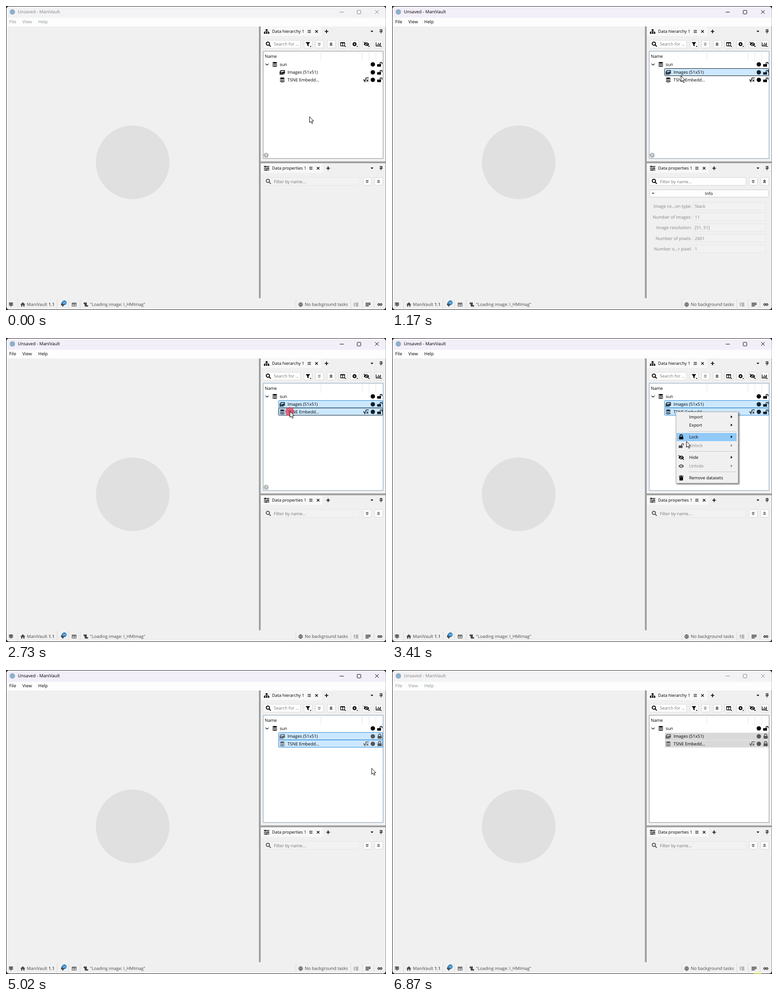
Recreate the animation shown at these times as an HTML page with a canvas. Size 837 by 669 pixels, loop 6930 ms.

```html
<!DOCTYPE html>
<html lang="en">
<head>
<meta charset="utf-8">
<title>Locking datasets</title>
<style>
html, body { margin: 0; width: 100%; height: 100%; overflow: hidden; background: #f0f0f0; }
canvas { display: block; }
</style>
</head>
<body>
<canvas id="stage" width="837" height="669"></canvas>
<script>
const ctx = document.getElementById('stage').getContext('2d');
const LOOP = 6930;
const FONT = '"Open Sans", "Noto Sans", sans-serif';

// Moments at which the interface switches state
const AT = { focus: 830, both: 1930, menu: 2860, sub: 4000, lock: 4890, blur: 6790 };
const CLICKS = [[830, 1030], [1930, 2130], [2730, 2860], [4890, 4960]];
const PATH = [
  [70, 668, 243], [760, 638, 146], [1030, 638, 146], [1170, 636, 153],
  [1520, 629, 160], [1660, 625, 161], [2860, 625, 161], [3410, 648, 227],
  [3480, 648, 228], [3740, 648, 228], [4200, 757, 217], [4420, 803, 217],
  [4490, 805, 216], [5770, 805, 216], [6000, 816, 330], [6320, 805, 672]
];

const band = y => `M-5 ${y}q5 2.6 10 0v1.7q-5 2.6-10 0z`;
const EYE = 'M-6 0Q0-8 6 0Q0 8-6 0ZM2.6 0a2.6 2.6 0 1 0-5.2 0a2.6 2.6 0 1 0 5.2 0ZM1.2 0a1.2 1.2 0 1 0-2.4 0a1.2 1.2 0 1 0 2.4 0Z';
const cog = r => Array.from({ length: 8 }, (_, i) => {
  const a = i * Math.PI / 4, c = Math.cos(a), s = Math.sin(a);
  return `M${c * r * .6} ${s * r * .6}L${c * r} ${s * r}`;
}).join('') + `M${r * .58} 0a${r * .58} ${r * .58} 0 1 0 ${-r * 1.16} 0a${r * .58} ${r * .58} 0 1 0 ${r * 1.16} 0`;

// f: filled path, s: stroked path, w: stroke width
const GLYPHS = {
  home: { f: 'M-5.5 0L0-5L5.5 0H3.8V4.5H1.2V1.5H-1.2V4.5H-3.8V0Z' },
  db: { f: 'M-5-3.3a5 1.9 0 0 1 10 0v.6q-5 2.6-10 0z' + band(-1.1) + band(2.2) },
  image: { f: 'M-2 1L0-1.5L1 0L3-2.5L5 1.5H-2Z', s: 'M-3.2-4H5V2.2H-3.2ZM-5-2V4.3H3', w: 1.5 },
  lock: { f: 'M-4.5-1H4.5V5H-4.5Z', s: 'M-2.6-1V-2.7a2.6 2.6 0 0 1 5.2 0V-1', w: 1.6 },
  unlock: { f: 'M-5.5-.5H3V5H-5.5Z', s: 'M1 0V-2.5a2.1 2.1 0 0 1 4.2 0V-.5', w: 1.5 },
  dot: { f: 'M4.8 0a4.8 4.8 0 1 0-9.6 0a4.8 4.8 0 1 0 9.6 0Z' },
  eye: { f: EYE },
  hidden: { f: EYE, s: 'M-6-5L6 5', w: 1.5 },
  trash: { f: 'M-5-4.5H-2L-1.3-5.5H1.3L2-4.5H5V-3H-5ZM-4.2-2.2H4.2L3.7 5.5H-3.7Z' },
  search: { s: 'M2.4-1.2a3.6 3.6 0 1 0-7.2 0a3.6 3.6 0 1 0 7.2 0M1.6 1.6L5.2 5.2', w: 2 },
  funnel: { f: 'M-5-4.5H5L1.4 0V5L-1.4 3V0Z' },
  down: { s: 'M-2.6-3L0-.7L2.6-3M-2.6 .6L0 2.9L2.6 .6', w: 1.4 },
  up: { s: 'M-2.6 3L0 .7L2.6 3M-2.6-.6L0-2.9L2.6-.6', w: 1.4 },
  fold: { s: 'M-3.4-1.7L0 1.7L3.4-1.7', w: 1.2 },
  foldSmall: { s: 'M-2-1L0 1L2-1', w: 1.1 },
  columns: { f: 'M-5-4H5V-2H-5Z', s: 'M-4.4-3.5H4.4V3.7H-4.4ZM0-3V3.7', w: 1.4 },
  gear: { s: cog(4.6), w: 2.1 },
  gears: { s: cog(3), w: 1.5 },
  chart: { s: 'M-5-4V4H5M-2.2 2.5V0M.4 2.5V-3M2.8 2.5V-1M4.8 2.5V-3.5', w: 1.3 },
  tree: { f: 'M-2-5H2V-1.5H-2ZM-6 1.8H-2.8V5H-6ZM-1.6 1.8H1.6V5H-1.6ZM2.8 1.8H6V5H2.8Z', s: 'M0-2V2M-4.4 2V.2H4.4V2', w: 1 },
  sliders: { s: 'M-6-3.8H6M-6 0H6M-6 3.8H6M-3-5.5V-2.1M3-1.7V1.7M-1 2.1V5.5', w: 1.5 },
  burger: { s: 'M-3.5-2.5H3.5M-3.5 0H3.5M-3.5 2.5H3.5', w: 1 },
  close: { s: 'M-2.8-2.8L2.8 2.8M2.8-2.8L-2.8 2.8', w: 1.3 },
  plus: { s: 'M-4 0H4M0-4V4', w: 1.7 },
  caret: { f: 'M-3.2-1.6H3.2L0 1.8Z' },
  arrow: { f: 'M-1.8-3L1.8 0L-1.8 3Z' },
  pin: { s: 'M-2.7-4H2.7M-1.7-4V.7M1.3-4V.7M2-4V.7M-3.3 .7H3.3M0 .7V4.6', w: 1.1 },
  root: { s: 'M-6 .5L-4.4 0L-2.5 4L0-4.2H6M1-.5L5 3.8M5-.5L1 3.8', w: 1.5 },
  pointer: { f: 'M-3.5-7V5L-.8 2.5L1.2 6.6L3 5.7L1 2H4.8Z' },
  globe: { s: 'M4.4 0a4.4 4.4 0 1 0-8.8 0a4.4 4.4 0 1 0 8.8 0M-4.4-1.2H4.4M-4.4 1.5H4.4M0-4.4V4.4M2 0a2 4.4 0 1 0-4 0a2 4.4 0 1 0 4 0', w: .9 },
  list: { s: 'M-1-3H5M-1 0H5M-1 3H5M-5-3L-4-2L-2.5-4M-5 0L-4 1L-2.5-1M-4.7 3H-3', w: 1 },
  grid: { s: 'M-5-3H6M-5 0H6M-5 3H2', w: 1.8 },
  sign: { f: 'M-4.5-4.3H3.5L5-2.9L3.5-1.5H-4.5ZM-3.5-.4H4.5V2.3H-3.5L-5 1Z', s: 'M0-5V5', w: 1.3 },
  plug: { f: 'M-4-1H4V1Q3 4 0 4Q-3 4-4 1Z', s: 'M-2-4V-1M2-4V-1M0 3V6', w: 1.4 },
  table: { s: 'M-4.4-3.5H4.4V3.5H-4.4ZM-4.4-.5H4.4M0-3.5V3.5M-4.4-2.8H4.4', w: 1.1 },
  scroll: { f: 'M-5-4.5H2V1.5H5V3Q5 4.5 3.5 4.5H-1.5Q-3 4.5-3-1H-5Z' }
};
for (const g of Object.values(GLYPHS)) {
  if (g.f) g.f = new Path2D(g.f);
  if (g.s) g.s = new Path2D(g.s);
}

function icon(name, x, y, color = '#000') {
  const g = GLYPHS[name];
  ctx.save();
  ctx.translate(x, y);
  ctx.fillStyle = ctx.strokeStyle = color;
  if (g.f) ctx.fill(g.f, 'evenodd');
  if (g.s) { ctx.lineWidth = g.w; ctx.stroke(g.s); }
  ctx.restore();
}
function rect(x, y, w, h, color) {
  ctx.fillStyle = color;
  ctx.fillRect(x, y, w, h);
}
function box(x, y, w, h, fill, border, r = 0) {
  ctx.beginPath();
  ctx.roundRect(x + .5, y + .5, w - 1, h - 1, r);
  if (fill) { ctx.fillStyle = fill; ctx.fill(); }
  ctx.strokeStyle = border;
  ctx.lineWidth = 1;
  ctx.stroke();
}
function disc(x, y, r, color) {
  ctx.beginPath();
  ctx.arc(x, y, r, 0, 7);
  ctx.fillStyle = color;
  ctx.fill();
}
// y is the middle of the line
function text(s, x, y, color = '#000', align = 'left', size = 9.5, weight = 400) {
  ctx.font = `${weight} ${size}px ${FONT}`;
  ctx.textAlign = align;
  ctx.fillStyle = color;
  ctx.fillText(s, x, y + 3.4);
}

function cursorAt(t) {
  const i = PATH.findIndex(k => k[0] > t);
  if (i === 0) return PATH[0].slice(1);
  if (i < 0) return PATH[PATH.length - 1].slice(1);
  const [t0, x0, y0] = PATH[i - 1], [t1, x1, y1] = PATH[i];
  const u = (t - t0) / (t1 - t0), e = u * u * (3 - 2 * u);
  return [x0 + (x1 - x0) * e, y0 + (y1 - y0) * e];
}

function drawWindow(focused) {
  const ink = focused ? '#000' : '#858585';
  rect(0, 0, 837, 26, focused ? '#f3eff9' : '#f3f2f5');
  disc(14, 13, 6, '#8fb0cc');
  text('Unsaved - ManiVault', 26, 13, ink, 'left', 9.7);
  rect(735, 13, 9, 1, ink);
  box(773, 9, 9, 9, null, ink, 1);
  ctx.beginPath();
  ctx.moveTo(813, 9); ctx.lineTo(821, 17);
  ctx.moveTo(821, 9); ctx.lineTo(813, 17);
  ctx.stroke();
  rect(0, 26, 837, 19, '#fdfdfd');
  ['File', 'View', 'Help'].forEach((s, i) => text(s, [7, 36, 71][i], 35, focused ? '#000' : '#87958f', 'left', 9.7));
  disc(279, 344, 81, '#e0e0e0');
  rect(557, 45, 4, 598, '#a0a0a0');
  rect(561, 342, 276, 4, '#a0a0a0');
}

function drawTab(glyph, title, y, shift) {
  rect(562, y - 10, 132 + shift, 20, '#f8f8f8');
  icon(glyph, 574, y);
  text(title, 586, y, '#000', 'left', 9.3);
  icon('burger', 668 + shift, y);
  icon('close', 684 + shift, y);
  icon('plus', 706 + shift, y);
  icon('caret', 806, y);
  icon('pin', 826, y);
}

function button(glyph, x, y, color, menu) {
  box(x - 9, y - 9, 19, 18, '#fcfcfc', '#d6d6d6', 2);
  icon(glyph, x, y, color);
  if (menu) rect(x + 5, y + 4, 2, 2, '#000');
}

function drawRow(y, glyph, label, row) {
  if (row.fill) rect(601, y - 8, 229, 16, row.fill);
  if (row.border) box(600, y - 9, 230, 17, null, row.border, 1);
  const c = row.locked ? '#555' : row.selected ? '#10202c' : '#000';
  icon(glyph, 608.5, y, c);
  text(label, 620, y);
  icon('dot', 808, y, c);
  icon(row.locked ? 'lock' : 'unlock', 823, y, c);
  if (glyph === 'db') icon('root', 793, y, c);
}

function drawHierarchy(t, focused, [cx, cy]) {
  drawTab('tree', 'Data hierarchy 1', 56, 0);
  box(566, 75, 83, 18, '#fff', '#dcdcdc', 2);
  icon('search', 578, 84);
  text('Search for ...', 590, 84, '#757575');
  button('funnel', 665, 84, '#000', true);
  button('down', 690, 84, '#777');
  button('up', 716, 84);
  ['columns', 'gear', 'hidden', 'chart'].forEach((g, i) => button(g, 741.5 + i * 26.2, 84, '#000', true));

  box(566, 99, 265, 237, '#fff', focused ? '#7f9db9' : '#8a8d92');
  text('Name', 570, 111);
  for (const x of [693, 784, 799, 814]) rect(x, 101, 1, 20, '#e5e5e5');
  icon('fold', 575, 128.5);
  icon('db', 592, 128.5);
  text('sun', 603, 129);
  icon('dot', 808, 128.5);
  icon('unlock', 823, 128.5);

  const locked = t >= AT.lock, menu = t >= AT.menu && t < AT.lock;
  const rowAt = (y, since, current) => {
    const selected = t >= since;
    const hover = !menu && cx > 566 && cx < 830 && Math.abs(cy - y) < 8.5;
    const fill = selected ? (focused ? '#cce8ff' : '#d9d9d9') : hover && '#e5f3ff';
    const border = selected && focused && (current ? '#101820' : '#2a86d1');
    return { selected, locked, fill, border };
  };
  drawRow(146, 'image', 'Images (51x51)', rowAt(146, AT.focus, t < AT.both));
  drawRow(162.5, 'db', 'TSNE Embedd...', rowAt(162.5, AT.both, t < AT.menu));

  if (t < AT.menu) {
    disc(573, 328.5, 5.5, '#b4b4b4');
    text('?', 573, 328.5, '#fff', 'center', 8.5, 700);
  }
}

function drawProperties(shown) {
  drawTab('sliders', 'Data properties 1', 357, 3.5);
  box(566, 377, 214, 18, shown ? '#fff' : '#f2f2f2', shown ? '#d4d4d4' : '#e7e7e7', 2);
  icon('search', 578, 386, shown ? '#000' : '#555');
  text('Filter by name...', 590, 386.5, '#757575');
  button('down', 795.5, 386, '#444');
  button('up', 820.5, 386, shown ? '#000' : '#444');
  if (!shown) return;
  box(567, 404, 263, 17, '#fdfdfd', '#cdcdcd', 2);
  icon('foldSmall', 575, 412);
  text('Info', 698, 412.5, '#000', 'center');
  [['Image co...on type:', 'Stack'], ['Number of images:', '11'], ['Image resolution:', '[51, 51]'],
   ['Number of pixels:', '2601'], ['Number o...r pixel:', '1']].forEach(([label, value], i) => {
    const y = 440.5 + i * 23.6;
    box(664, Math.round(y) - 9, 159, 17, '#f2f2f2', '#e5e5e5');
    text(label, 660, y, '#858585', 'right', 9.6);
    text(value, 667, y, '#808080');
  });
}

function drawStatus() {
  const c = '#484848';
  for (const x of [25, 112, 137, 163, 638, 759, 784, 810]) rect(x, 645, 1, 22, '#dadada');
  icon('sign', 11, 657, c);
  icon('home', 37, 657, c);
  text('ManiVault', 46, 657, c, 'left', 9.6);
  text('1.1', 107, 657, c, 'right', 9.6, 600);
  icon('plug', 125, 656, c);
  disc(128.5, 653, 5, '#1976bd');
  text('26', 128.5, 652, '#fff', 'center', 6, 600);
  icon('table', 150, 657, c);
  icon('scroll', 176, 657, c);
  text('"Loading image: I_HMImag"', 185, 657, c);
  icon('globe', 649, 657, c);
  text('No background tasks', 658, 657, c, 'left', 9.7);
  icon('list', 771, 657, c);
  icon('grid', 797, 657, c);
  icon('gears', 821, 657, c);
  icon('gears', 826, 657, c);
}

function panel(x, y, w, h) {
  ctx.save();
  ctx.shadowColor = 'rgba(0,0,0,.55)';
  ctx.shadowBlur = 3;
  ctx.shadowOffsetX = ctx.shadowOffsetY = 2;
  rect(x, y, w, h, '#f0f0f0');
  ctx.restore();
  box(x, y, w, h, '#f0f0f0', '#a5a5a5');
}

const ITEMS = [
  ['Import', 174, null, true], ['Export', 192, null, true], ['Lock', 218, 'lock', true],
  ['Unlock', 237, 'unlock', true, true], ['Hide', 263, 'hidden', true],
  ['Unhide', 282, 'eye', true, true], ['Remove datasets', 308, 'trash']
];

function drawMenu(sub, [cx, cy]) {
  const over = (y, x0, x1) => cx >= x0 && cx < x1 && cy >= y - 9 && cy < y + 9.8;
  panel(625, 162, 138, 158);
  for (const y of [205, 249, 294]) rect(653, y, 106, 1, '#c8c8c8');
  for (const [label, y, glyph, more, disabled] of ITEMS) {
    const active = sub ? label === 'Lock' : over(y, 627, 762);
    if (active && !disabled) rect(627, y - 9, 132, 18, '#91c9f7');
    const c = disabled ? '#858585' : '#000';
    if (glyph) icon(glyph, 637, y, disabled ? '#4c4c55' : c);
    text(label, 654.5, y, c, 'left', 9.4);
    if (more) icon('arrow', 748, y - .5, c);
  }
  if (!sub) return;
  panel(761, 206, 80, 42);
  if (over(218, 763, 837)) rect(763, 209, 74, 18, '#91c9f7');
  icon('pointer', 768, 218);
  text('Selected', 786, 218.5, '#000', 'left', 9.4);
  text('All', 786, 237, '#000', 'left', 9.4);
}

const ARROW = new Path2D('M0 0V13L3 10.4L5.2 15.2L7.3 14.2L5.2 9.6H9.2Z');
function drawCursor(x, y) {
  ctx.save();
  ctx.translate(x + .5, y + .5);
  ctx.fillStyle = '#fff';
  ctx.strokeStyle = '#000';
  ctx.lineWidth = 1;
  ctx.fill(ARROW);
  ctx.stroke(ARROW);
  ctx.restore();
}

function draw(t) {
  const focused = t >= AT.focus && t < AT.blur;
  const tip = cursorAt(t);
  ctx.textRendering = 'geometricPrecision';
  rect(0, 0, 837, 669, '#252525');
  ctx.save();
  ctx.beginPath();
  ctx.roundRect(1, 1, 835.5, 667, 6);
  ctx.clip();
  rect(0, 0, 837, 669, '#f0f0f0');
  drawWindow(focused);
  drawHierarchy(t, focused, tip);
  drawProperties(t >= AT.focus && t < AT.both);
  drawStatus();
  ctx.restore();
  if (t >= AT.menu && t < AT.lock) drawMenu(t >= AT.sub, tip);
  if (CLICKS.some(([a, b]) => t >= a && t < b)) disc(tip[0], tip[1] + 1, 10, 'rgba(226,62,84,.75)');
  if (t >= AT.blur) disc(805, 674, 10, 'rgba(255,250,110,.6)');
  drawCursor(...tip);
}

const start = performance.now();
function tick() {
  draw((performance.now() - start) % LOOP);
  requestAnimationFrame(tick);
}
tick();
</script>
</body>
</html>
```
